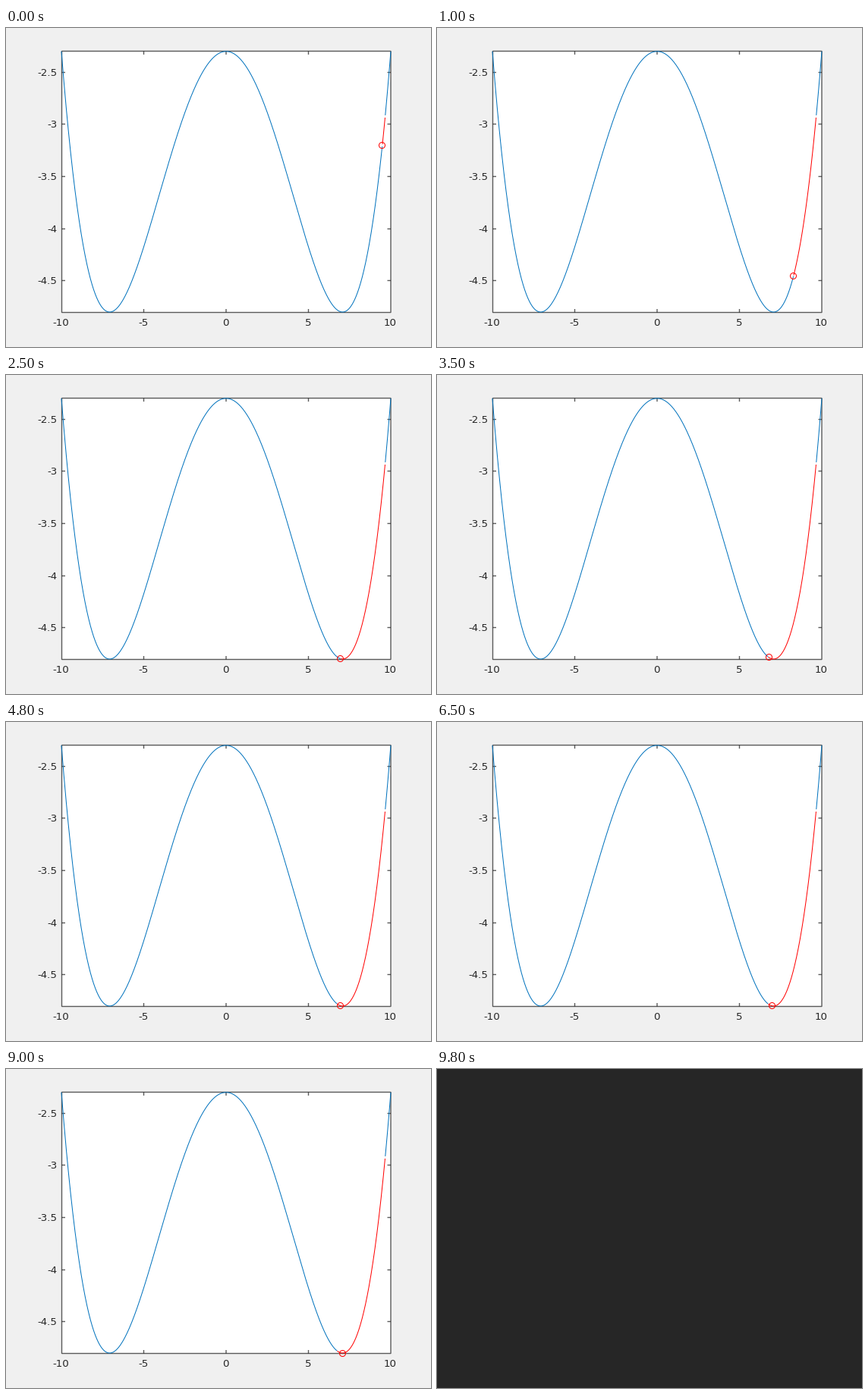
Animation of 560x420 px, one loop 9900 ms. Source, as a matplotlib script:

```python
import numpy as np
import matplotlib.pyplot as plt
from matplotlib.animation import FuncAnimation
from matplotlib.patches import Circle, Rectangle

W, H, DPI = 560, 420, 100
PX = 72 / DPI                      # one pixel in points
LEFT, RIGHT, TOP, BOTTOM = 73.5, 507, 30.5, 374.5
CX, UX = 290.0, 21.7               # pixel of x = 0, pixels per unit
BASE, UY = 374.0, 137.3            # pixel row of the minimum, pixels per unit
WELL = CX + UX * np.sqrt(50)       # pixel of the right minimum
INK = "#262626"
STEPS = 98
START = 499.6                      # where the trail begins


def to_row(value):
    return BASE - UY * (value + 4.8)


def row(px):
    """Pixel height of the double well at a pixel column."""
    u = ((px - CX) / UX) ** 2
    return to_row(0.001 * u * u - 0.1 * u - 2.3)


def descent(t):
    """Fast fall past the minimum, then a slow return to it."""
    fall = 58.2 * (1 - np.minimum(t / 28.5, 1) ** 0.9) ** 1.08
    return WELL - 8.5 / np.cosh(0.052 * (t - 18)) + fall


path = descent(np.arange(STEPS))
reach = np.minimum.accumulate(path)

fig = plt.figure(figsize=(W / DPI, H / DPI), dpi=DPI, facecolor="#f0f0f0")
ax = fig.add_axes([0, 0, 1, 1])
ax.set(xlim=(0, W), ylim=(H, 0))
ax.axis("off")


def line(xs, ys, color, z, **style):
    return ax.plot(xs, ys, color=color, zorder=z, snap=False,
                   solid_capstyle="butt", **{"lw": PX, **style})[0]


def frame_line(xs, ys):
    line(xs, ys, INK, 2, lw=1.4 * PX, alpha=0.75, solid_joinstyle="miter")


def label(x, y, value, ha):
    ax.text(x, y, f"{value:g}", ha=ha, va="baseline", color=INK,
            family="DejaVu Sans", fontsize=13.33 * PX)


ax.add_patch(Rectangle((LEFT, TOP), RIGHT - LEFT, BOTTOM - TOP, fc="white",
                       ec="none", zorder=1, snap=False))
frame_line([LEFT, RIGHT, RIGHT, LEFT, LEFT],
           [TOP, TOP, BOTTOM, BOTTOM, TOP])

TICK = 4.5
for v in range(-10, 11, 5):
    x = CX + v * UX
    if abs(v) < 10:
        frame_line([x, x], [BOTTOM, BOTTOM - TICK])
        frame_line([x, x], [TOP, TOP + TICK])
    label(x - 0.7, 392, v, "center")

for v in np.arange(-4.5, -2, 0.5):
    y = np.floor(to_row(v)) + 0.5
    frame_line([LEFT, LEFT + TICK], [y, y])
    frame_line([RIGHT, RIGHT - TICK], [y, y])
    label(67.7, y + 4.6, v, "right")

span = np.linspace(CX - 10 * UX, CX + 10 * UX, 1500)
heights = row(span)
curve = line(span, heights, "#0072bd", 3)
trail = line([], [], "red", 4)
dot = ax.add_patch(Circle((0, 0), 4, fill=False, ec="red", lw=PX, zorder=5,
                          snap=False))
cover = ax.add_patch(Rectangle((-1, -1), W + 2, H + 2, fc=INK, ec="none",
                               zorder=10, visible=False))


def draw(i):
    cover.set_visible(i >= STEPS)
    k = min(i, STEPS - 1)
    # the trail replaces its stretch of the curve
    done = (span >= reach[k]) & (span <= START)
    curve.set_ydata(np.where(done, np.nan, heights))
    trail.set_data(span[done], heights[done])
    # the marker sits on whole pixels
    dot.center = (np.floor(path[k]) + 0.5,
                  np.floor(row(path[k]) + 0.01) + 0.5)
    return curve, trail, dot, cover


anim = FuncAnimation(fig, draw, frames=STEPS + 1, interval=100, repeat=True)
plt.show()
```
